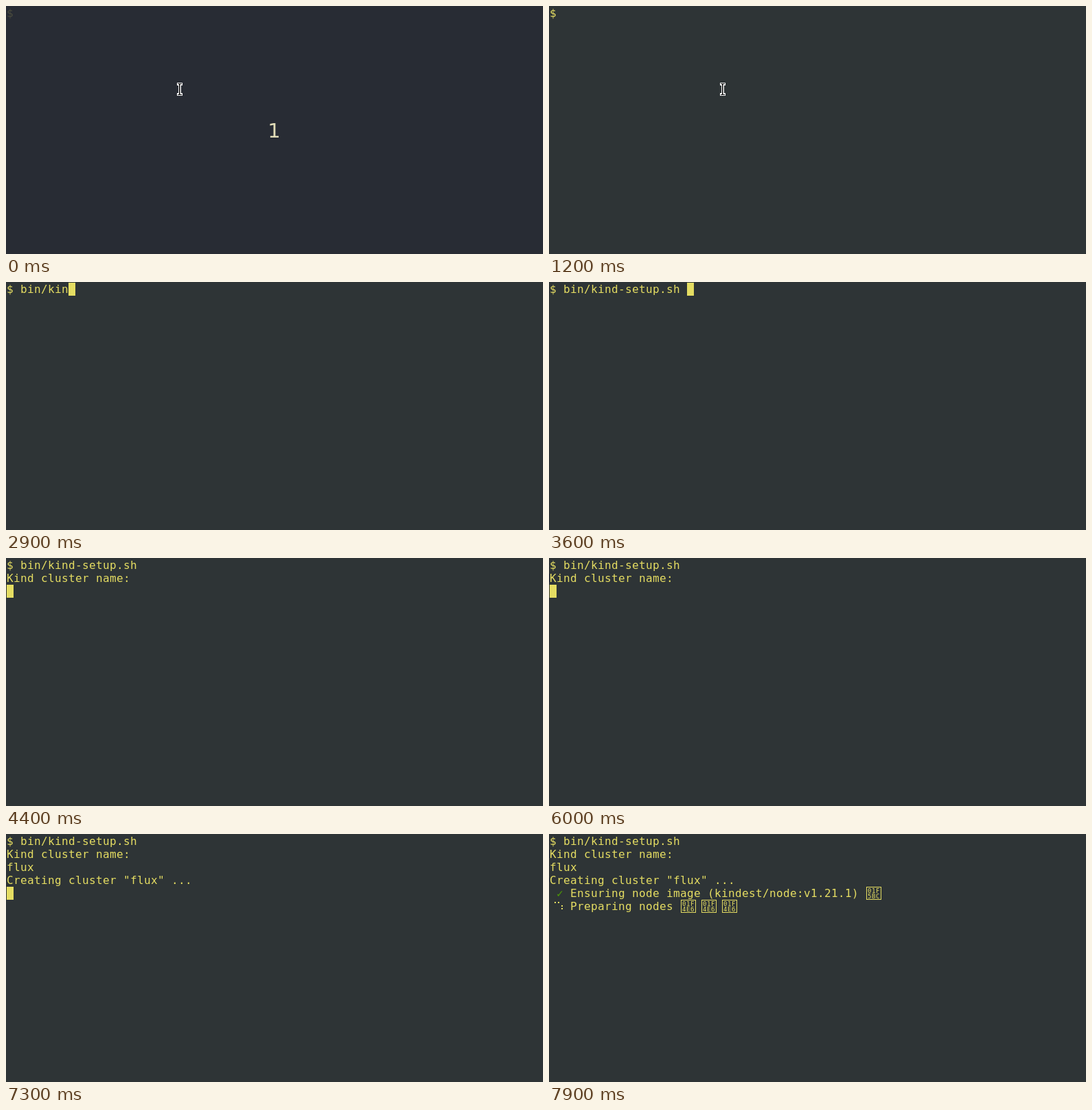
Recreate the animation shown at these times as an HTML page with a canvas. Size 782 by 362 pixels, loop 8 s.

```html
<!DOCTYPE html>
<html lang="en">
<head>
<meta charset="utf-8">
<title>Terminal session</title>
<style>
  html, body { margin: 0; width: 100%; height: 100%; overflow: hidden; background: #2e3436; }
  canvas { display: block; width: 782px; height: 362px; }
</style>
</head>
<body>
<canvas id="stage" width="782" height="362"></canvas>
<script>
const ctx = document.getElementById('stage').getContext('2d');
const LOOP = 8000, CELL = 10, LINE = 19;
const BG = '#2e3436', INK = '#e5dd62', GREEN = '#4e9a06';
const MONO = '"DejaVu Sans Mono", monospace';

const command = '$ bin/kind-setup.sh ';
const ask = command + '\nKind cluster name:\n';
const create = ask + 'flux\nCreating cluster "flux" ...\n';
const image = ' Ensuring node image (kindest/node:v1.21.1) 🖼 ';
const ready = create + ' ✓' + image + '\n';
const nodes = ' Preparing nodes 📦 📦 📦 ';

// [start in ms, screen text, cursor shown at the end of the text]
const steps = [
  [0, '$ ', false],
  [600, '$ ', true],
  [1200, '$ ', false],
  [1600, '$ bi', true],
  [1700, '$ bin', true],
  [2200, '$ bin/', true],
  [2500, '$ bin/k', true],
  [2700, '$ bin/ki', true],
  [2900, '$ bin/kin', true],
  [3100, '$ bin/kind', true],
  [3400, '$ bin/kind-', true],
  [3500, '$ bin/kind-s', true],
  [3600, command, true],
  [4200, command, false],
  [4400, ask, true],
  [5000, ask, false],
  [6000, ask, true],
  [6200, ask, false],
  [6300, ask + 'f', true],
  [6600, ask + 'flu', true],
  [6700, ask + 'flux', true],
  [6900, ask + 'flux\n', true],
  [7300, create, true],
  [7400, create + '⠈⠁' + image, true],
  [7600, create + '⠈⠑' + image, false],
  [7700, ready + '⠈⠁' + nodes, false],
  [7800, ready + '⠈⠑' + nodes, false],
  [7900, ready + '⠈⠱' + nodes, false]
];

// Box with the hex code of a character the font lacks
function hexBox(code, x, y) {
  const hex = code.toString(16).toUpperCase().padStart(6, '0');
  ctx.strokeStyle = INK;
  ctx.lineWidth = 1;
  ctx.strokeRect(x + 1.5, y + 0.5, 21, 18);
  ctx.font = '9px ' + MONO;
  [...hex].forEach((c, i) =>
    ctx.fillText(c, x + 3 + (i % 3) * 6, y + (i < 3 ? 9 : 17)));
}

// Bits 0-2 are the left dots, bits 3-5 the right dots
function braille(code, x, y) {
  for (let i = 0; i < 6; i++) {
    if (code >> i & 1) ctx.fillRect(x + (i < 3 ? 2 : 7), y + [3, 8, 12][i % 3], 2, 2);
  }
}

function glyph(c, x, y, ink) {
  const code = c.codePointAt(0);
  ctx.fillStyle = c === '✓' ? GREEN : ink;
  if (code > 0xffff) return hexBox(code, x, y);
  if (code >= 0x2800 && code < 0x2900) return braille(code - 0x2800, x, y);
  ctx.font = '16px ' + MONO;
  ctx.fillText(c, x, y + 15);
}

function drawScreen(text, cursor, ink) {
  let x = 1, y = 1;
  for (const c of text) {
    if (c === '\n') {
      x = 1;
      y += LINE;
    } else {
      glyph(c, x, y, ink);
      x += c === '📦' ? 2 * CELL : CELL;
    }
  }
  ctx.fillStyle = INK;
  if (cursor) ctx.fillRect(x, y, CELL, LINE);
}

function drawPointer() {
  ctx.fillStyle = '#fff';
  ctx.fillRect(249, 112, 8, 4);
  ctx.fillRect(251, 113, 4, 16);
  ctx.fillRect(249, 127, 8, 4);
  ctx.fillStyle = '#000';
  ctx.fillRect(250, 113, 6, 1);
  ctx.fillRect(252, 113, 1.5, 16);
  ctx.fillRect(250, 129, 6, 1);
}

function drawCount() {
  ctx.font = '29px "DejaVu Sans", sans-serif';
  ctx.textAlign = 'center';
  ctx.fillStyle = '#e2ddb8';
  ctx.fillText('1', 390.5, 192);
  ctx.textAlign = 'left';
}

function draw(t) {
  const counting = t < 100;
  const [, text, cursor] = steps.findLast(s => s[0] <= t);
  ctx.fillStyle = counting ? '#282c34' : BG;
  ctx.fillRect(0, 0, 782, 362);
  drawScreen(text, cursor, counting ? '#4b4c3e' : INK);
  if (counting) drawCount();
  if (t < 1600) drawPointer();
}

const start = performance.now();
function tick() {
  draw((performance.now() - start) % LOOP);
  requestAnimationFrame(tick);
}
tick();
</script>
</body>
</html>
```
